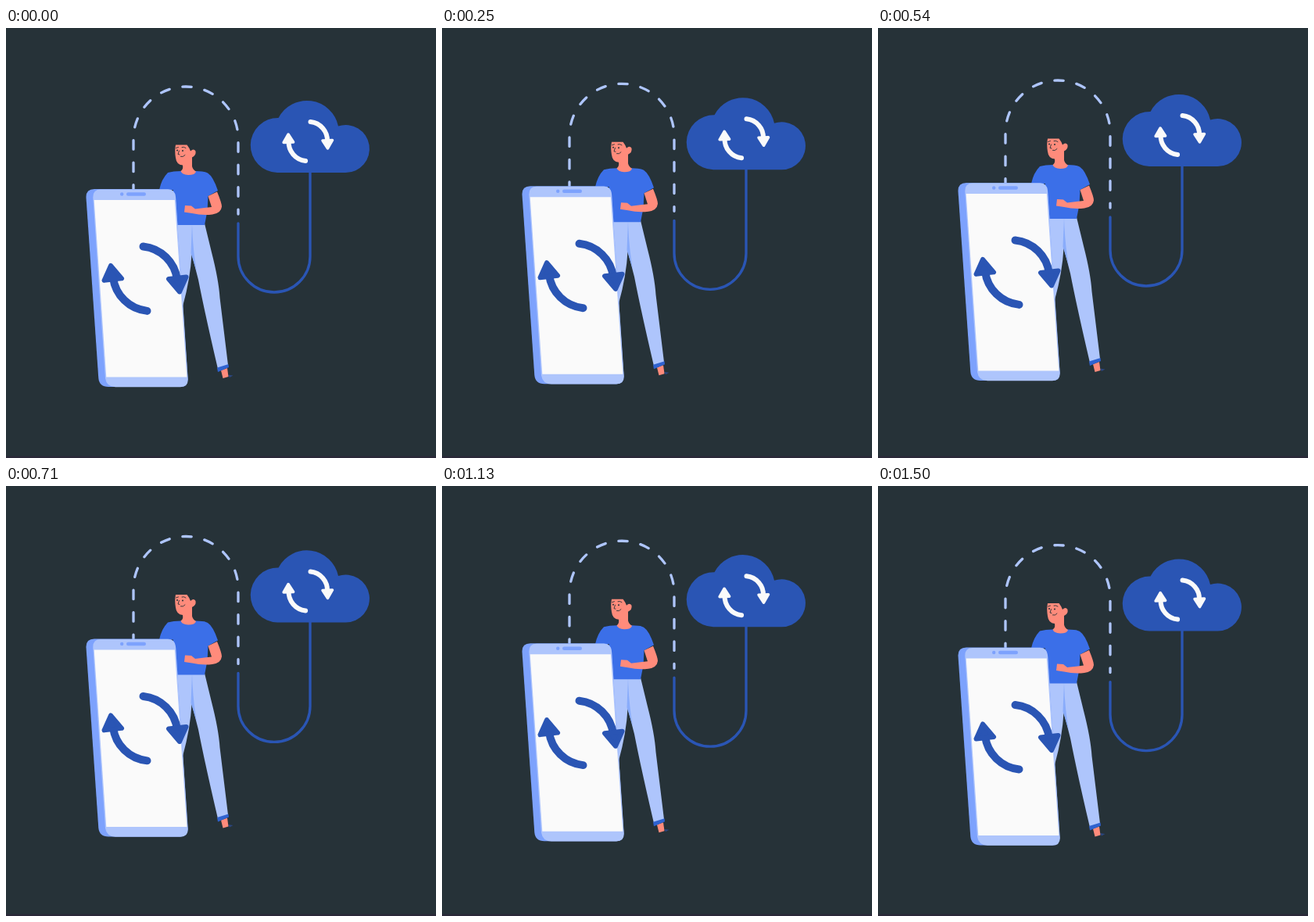
Write an HTML page that moves like this. It is 550 px wide and 550 px high and loops after 1540 ms.

```html
<!DOCTYPE html>
<html lang="en">
<head>
<meta charset="utf-8">
<title>Cloud sync</title>
<style>
  html, body { margin: 0; width: 100%; height: 100%; overflow: hidden; background: #263238; }
  svg { display: block; width: 100%; height: 100%; }
  .navy { fill: #2a55b4; }
  .pale { fill: #aec5fc; }
  .mid { fill: #7da2fd; }
  .shirt { fill: #3b6fe8; }
  .skin { fill: #ff8b7b; }
  .line { fill: none; stroke: #2a55b4; stroke-width: 3.3; stroke-linecap: round; }
  .dashed { stroke: #aec5fc; stroke-dasharray: 11.5 17; stroke-dashoffset: 5.75; }
  .face { fill: none; stroke: #263238; stroke-width: .9; stroke-linecap: round; }
  .arrow { stroke-linecap: round; stroke-linejoin: round; }
</style>
</head>
<body>
<svg viewBox="0 0 550 550">
  <defs>
    <g id="phoneArrow" class="arrow" stroke="#2a55b4">
      <path d="M175.500 279.500A49 49 0 0 1 219 322" fill="none" stroke-width="10"/>
      <path class="navy" d="M208 321L230.500 318.500 222 337.500Z" stroke-width="6"/>
    </g>
    <g id="cloudArrow" class="arrow" stroke="#fafafa">
      <path d="M389.500 120A24 24 0 0 1 411 145" fill="none" stroke-width="6"/>
      <path d="M405 144L417.500 143.500 411.500 154Z" fill="#fafafa" stroke-width="3.500"/>
    </g>
  </defs>

  <rect y="547.500" width="550" height="2.500" fill="#2a2838"/>

  <g id="scene">
    <path class="line dashed" d="M297 238V142A67 67 0 0 0 163 142V206"/>
    <path class="line" d="M297 250V292A46 46 0 0 0 389 292V180"/>

    <!-- cloud -->
    <path class="navy" d="M347 185A35 35 0 0 1 348.500 115A41 41 0 0 1 425 125.500A30.500 30.500 0 1 1 434.500 185Z"/>
    <use href="#cloudArrow"/>
    <use href="#cloudArrow" transform="rotate(180 386.300 145)"/>

    <!-- legs -->
    <path d="M284 443.500L290.500 444.500 286 447Z" fill="#2b467f"/>
    <path class="skin" d="M275 438L283 435 284.500 446 277.500 448Z"/>
    <path class="pale" d="M214 250H254L263 287Q272 322 273.500 345L284 431 271 436Q255 368 246 322L237.500 289Q236 320 226 356L214 356Z"/>
    <path d="M238 251Q239 285 244 312L236.500 288Z" fill="#89acfb"/>
    <path d="M270 434.500L284.500 430 285 434 271 440Z" fill="#2f62cf"/>

    <!-- torso and arm -->
    <path class="shirt" d="M196 207Q199 193 207 185Q214 183 224 183L243 183Q254 183 258 185.500Q265 190 271 208L258.500 215 257.500 234 254 252H214V207Z"/>
    <path class="skin" d="M258.500 215L270 209.500Q276 224 276 228.500Q275 237 264 238.500Q251 240 238 237L228 235.500 229 227 237 227.500 242 231.500 263 229Z"/>

    <!-- head -->
    <path class="skin" d="M217 149.500H231.500Q235 154 236 157.500Q240 153.500 242.500 157.500Q243.500 163 238 165.500V177Q239 181 243 183.500Q242 188 233 188Q225 187.500 223.500 183Q227 181 226 175.500Q218 175 217 166Q215.500 157 217 149.500Z"/>
    <path class="face" d="M217.500 153.500L220.500 152.500M225 152.500Q227.500 151.500 230 153.500M221.500 157L220 161.500 222 162M223.500 164.500Q227 165.500 229 162.500"/>
    <circle cx="219" cy="156.500" r="1" fill="#263238"/>
    <circle cx="226" cy="157" r="1" fill="#263238"/>

    <!-- phone -->
    <path class="mid" d="M113 206H207Q216 206 217 216L232.500 449Q233 459 223 459H131Q119.500 459 118.300 448L102.500 217Q102 206 113 206Z"/>
    <path class="pale" d="M121 206.500H207Q216 206.500 217 216L232.700 449Q233 459.300 223 459.300H140Q128.500 459 127 448L111.300 217Q111 206.500 121 206.500Z"/>
    <path d="M112.700 220H215.800L231.300 446.500H128.300Z" fill="#fafafa"/>
    <circle class="mid" cx="148.200" cy="212.500" r="2.200"/>
    <rect class="mid" x="154" y="210.300" width="25" height="4.400" rx="2.200"/>
    <use href="#phoneArrow"/>
    <use href="#phoneArrow" transform="rotate(180 178 320.700)"/>
  </g>
</svg>
<script>
  const LOOP = 1540, PEAK_LEAD = 43, RISE = 11.4, TOP = 0.63;
  const scene = document.getElementById('scene');

  // Linear float: up for half the loop, down for the other half.
  function draw() {
    const phase = ((performance.now() + PEAK_LEAD) / LOOP) % 1;
    const y = TOP - RISE * (1 - Math.abs(1 - 2 * phase));
    scene.setAttribute('transform', `translate(0 ${y.toFixed(3)})`);
    requestAnimationFrame(draw);
  }
  draw();
</script>
</body>
</html>
```
